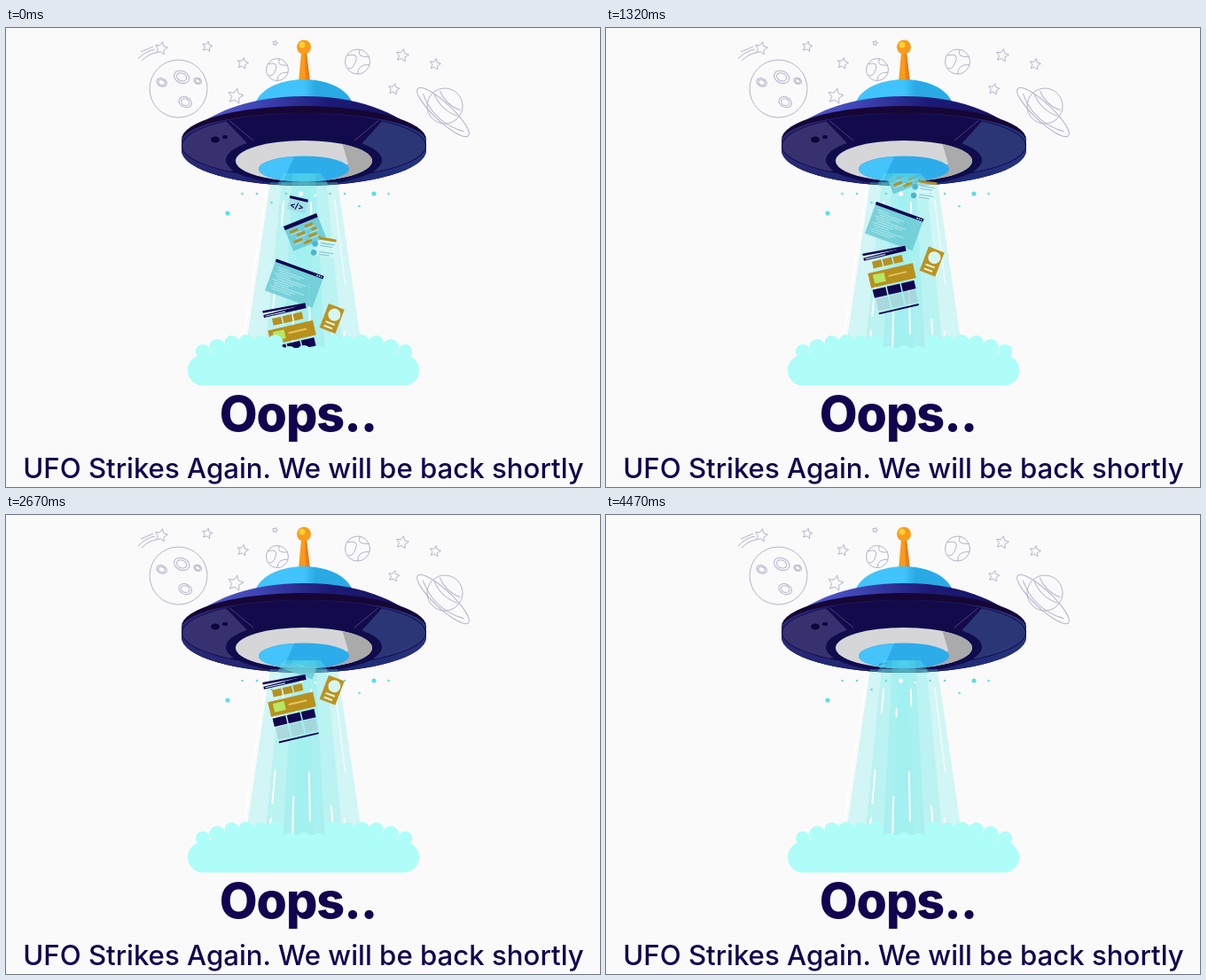
Animation of 670x518 px, one loop 4.5 s. Source, as an HTML page:

```html
<!DOCTYPE html>
<html lang="en">
<head>
<meta charset="utf-8">
<title>UFO</title>
<style>
  html, body { margin: 0; width: 100%; height: 100%; overflow: hidden; background: #fafafa; }
  svg { display: block; }
  text { font-family: Inter, "Open Sans", sans-serif; fill: #12044f; text-anchor: middle; }
  .navy { fill: #12044f; }
  .gold { stroke: #b8911c; }
</style>
</head>
<body>
<svg width="670" height="518" viewBox="0 0 670 518">
  <defs>
    <linearGradient id="hull"><stop stop-color="#5a62d8"/><stop offset=".3" stop-color="#4046b8"/><stop offset=".6" stop-color="#1d1b78"/><stop offset="1" stop-color="#141052"/></linearGradient>
    <linearGradient id="lip"><stop stop-color="#2a2a78"/><stop offset=".5" stop-color="#18206c"/><stop offset="1" stop-color="#26347e"/></linearGradient>
    <linearGradient id="dome"><stop offset=".5" stop-color="#41c4fc"/><stop offset=".62" stop-color="#2aaae4"/></linearGradient>
    <linearGradient id="fade" gradientUnits="userSpaceOnUse" x1="0" y1="166" x2="0" y2="175">
      <stop stop-color="#000"/><stop offset="1" stop-color="#fff"/>
    </linearGradient>
    <mask id="hatch" maskUnits="userSpaceOnUse" x="0" y="0" width="670" height="518">
      <rect width="670" height="518" fill="url(#fade)"/>
    </mask>
    <clipPath id="face"><ellipse cx="336" cy="133" rx="137" ry="36"/></clipPath>
    <clipPath id="ring"><ellipse cx="336" cy="150" rx="77" ry="23"/></clipPath>
  </defs>

  <g id="sky" fill="none" stroke="#b4b2cd">
    <path d="M149 35Q157 26 168 24M153 37Q161 29 169 28M152 27L166 21"/>
    <circle cx="495" cy="88" r="20"/>
    <g transform="rotate(43 493 95)">
      <ellipse cx="493" cy="95" rx="39" ry="10"/>
      <path d="M462 95Q493 111 525 95M472 87Q490 95 508 87M474 80Q490 87 506 80"/>
    </g>
  </g>

  <g id="ship">
    <path d="M333 28H339L343 61H330Z" fill="#f99b1c"/><path d="M337 28H339L343 61H338Z" fill="#ee7d17"/>
    <circle cx="336" cy="21.500" r="8" fill="#f99b1c"/><circle cx="334" cy="19" r="3.500" fill="#ffd22e"/>
    <path d="M281 85C295 49 377 49 391 85Z" fill="url(#dome)"/>
    <path d="M198 123C225 102 262 77 336 77S447 102 474 123Z" fill="url(#hull)"/>
    <path d="M198 126A138 38 0 0 1 474 126V138A138 40 0 0 1 198 138Z" fill="#160635"/>
    <path d="M198 128A138 32 0 0 1 474 128V138A138 40 0 0 1 198 138Z" fill="url(#lip)"/>
    <ellipse cx="336" cy="133" rx="138" ry="37" fill="#130a4c"/>
    <g clip-path="url(#face)">
      <path d="M198 108L246 103 274 132Q256 143 266 157L235 169 198 150Z" fill="#37316f"/>
      <path d="M474 107L426 103 400 132Q418 143 407 160L445 171 474 145Z" fill="#2b3677"/>
      <path d="M250 103L279 127M422 103L393 127" stroke="#443d7d"/>
    </g>
    <ellipse cx="336" cy="149" rx="88" ry="28" fill="#100b4b"/>
    <ellipse cx="236" cy="126" rx="5" ry="3.500" fill="#0c0739"/><ellipse cx="247" cy="123" rx="3" ry="2" fill="#0c0739"/>
    <g clip-path="url(#ring)">
      <rect x="258" y="126" width="156" height="48" fill="#d6d6d8"/>
      <path d="M378 126H414V174H360L386 153Z" fill="#aaaaab"/>
    </g>
    <ellipse cx="336" cy="159" rx="51" ry="14.500" fill="#2dacea"/>
    <path d="M285 159A51 14.500 0 0 1 325 145L313 172Q285 168 285 159Z" fill="#44c4fb"/>
  </g>

  <g id="beam" fill="#68e6e6"><path d="M314 164H355L364 177H306Z" opacity=".35"/></g>
  <g id="streaks" stroke="#fff" stroke-width="2" stroke-linecap="round"></g>
  <g id="dots"></g>

  <g mask="url(#hatch)"><g id="loot">
    <g transform="translate(320.500 189) rotate(13)">
      <rect width="21" height="16" fill="#a2dfe6"/><rect class="navy" width="21" height="3"/>
      <text x="10" y="13" font-size="9" font-weight="700">&lt;/&gt;</text>
    </g>
    <g transform="translate(313 224) rotate(-22)">
      <rect width="40" height="30" fill="#70cdd9"/><rect class="navy" width="40" height="4.500"/>
      <path class="gold" d="M4 9H36M10 15H34M4 21H32M14 26H34" stroke-width="3" stroke-dasharray="10 8"/>
      <path d="M4 12H34M8 18H36M4 24H34" stroke="#a8e4e9" stroke-dasharray="13 4"/>
    </g>
    <g transform="translate(346 235) rotate(9)">
      <path d="M7 0H27V21H3Z" fill="#def8f8" opacity=".6"/><path class="gold" d="M7 1H27" stroke-width="3"/>
      <path d="M4 8h0M4 18h0" stroke="#4eb4d0" stroke-width="6.600" stroke-linecap="round"/>
      <path d="M10 6H26M10 9H24M10 16H26M10 19H22" stroke="#88cbd7" stroke-width="1.300"/>
    </g>
    <g transform="translate(305 260.500) rotate(20)">
      <rect width="57" height="38" fill="#6ccbd5" opacity=".85"/><rect class="navy" width="57" height="3.500"/>
      <path d="M49 1.800H55" stroke="#dff" stroke-width="1.500" stroke-dasharray="1.500 1"/>
      <g id="code" stroke="#aee8ec"></g>
    </g>
    <g transform="translate(288 318.500) rotate(-13)">
      <path class="navy" d="M1 1L50 3V5.500L1 3.500ZM1 6L50 5V9H1Z"/><path d="M3 7.500H26" stroke="#ddf8f8"/>
      <path class="gold" d="M9.500 16H44" stroke-width="8" stroke-dasharray="10.500 1.500"/>
      <path class="gold" d="M2 32.500H54" stroke-width="17"/>
      <rect x="7" y="27" width="13" height="10" fill="#b8e765"/>
      <path d="M24 32H45" stroke="#e1c56a" stroke-width="2"/>
      <path d="M3 48H51" stroke="#12044f" stroke-width="9.500" stroke-dasharray="15 1.500"/>
      <path d="M4 61H50" stroke="#a4cfd4" stroke-width="14" stroke-dasharray="14 2" opacity=".75"/>
      <rect class="navy" x="4" y="70" width="46" height="2"/>
    </g>
    <g transform="translate(364 311) rotate(21)">
      <rect width="19" height="29" fill="#bd931e"/><circle cx="10.500" cy="9.500" r="7" fill="#d5f7f3"/>
      <path d="M4 20H15M4 25H14" stroke="#e5f8ee" stroke-width="2"/>
    </g>
  </g></g>

  <g id="cloud" fill="#aefdf8">
    <rect x="205" y="369" width="261" height="34.500" rx="17"/>
    <path d="M214 374L254 356H305L315 361H360L368 356H417L457 374Z"/>
  </g>

  <text x="329.500" y="455" font-size="55.500" font-weight="800" letter-spacing="-1">Oops..</text>
  <text x="335.500" y="508" font-size="31.200" font-weight="500">UFO Strikes Again. We will be back shortly</text>
</svg>
<script>
const LOOP = 4500, STEP = 30, SPEED = 0.0488;
const AXIS = 336, APEX = -84;   // the point all beam rays fan out from
const el = id => document.getElementById(id);
const rayX = (slope, y) => AXIS + slope * (y - APEX);

function add(parent, name, attrs) {
  const node = document.createElementNS("http://www.w3.org/2000/svg", name);
  for (const key in attrs) node.setAttribute(key, attrs[key]);
  el(parent).append(node);
}

function repeat(count, draw) {
  for (let i = 0; i < count; i++) draw(i);
}

function star(x, y, r) {
  let points = "";
  repeat(10, i => {
    const a = 0.2 + i * Math.PI / 5, d = i % 2 ? r * 0.48 : r;
    points += `${x + d * Math.sin(a)},${y - d * Math.cos(a)} `;
  });
  add("sky", "polygon", { points });
}

function planet(cx, cy, r) {
  add("sky", "circle", { cx, cy, r });
}

function globe(x, y, r) {
  planet(x, y, r);
  add("sky", "path", { d: `M${x - r * 0.85} ${y - r / 2}q${r} ${-r / 4} ${r * 0.7} ${r / 2}t${-r * 0.6} ${r / 2}
    M${x + r * 0.2} ${y - r}q${-r / 3} ${r * 0.7} ${r * 0.75} ${r * 0.6}M${x} ${y + r}q0 ${-r * 0.8} ${r * 0.95} ${-r * 0.75}` });
}

function moon(x, y, r) {
  planet(x, y, r);
  repeat(4, i => {
    const a = i * 2.4 - 1.3, d = r * (0.42 + i * 0.1);
    const cx = x + d * Math.cos(a), cy = y + d * Math.sin(a), size = 9 - i * 1.5;
    for (const scale of [1, 0.65])
      add("sky", "ellipse", { cx, cy, rx: size * scale, ry: size * scale * 0.75, transform: `rotate(25 ${cx} ${cy})` });
  });
}

function wedge(slope, top, opacity) {
  const bottom = 362, x = (side, y) => rayX(side * slope, y);
  add("beam", "path", { opacity, d: `M${x(-1, top)} ${top}H${x(1, top)}L${x(1, bottom)} ${bottom}H${x(-1, bottom)}Z` });
}

function streak(slope, y1, y2, opacity = 1) {
  add("streaks", "line", { x1: rayX(slope, y1), y1, x2: rayX(slope, y2), y2, opacity });
}

moon(194.5, 68.5, 32.5);
globe(306, 47, 12.5);
globe(396.5, 38, 14);
star(175, 23, 7.5);
star(227, 21, 6);
star(267, 40, 6.5);
star(259, 77, 9);
star(303.5, 17, 3);
star(447, 31, 7.5);
star(484, 41, 6.5);
star(437.5, 69, 6.5);

wedge(0.147, 174, 0.28);
wedge(0.098, 174, 0.22);
wedge(0.052, 164, 0.22);
wedge(0.025, 164, 0.1);

streak(-0.157, 184, 345, 0.7);
streak(0.125, 195, 290, 0.5);
streak(-0.082, 196, 223);
streak(-0.087, 288, 325);
streak(-0.087, 342, 350);
streak(-0.027, 219, 227);
streak(-0.029, 318, 360);
streak(0.028, 197, 215);
streak(0.016, 290, 345);
streak(0.075, 329, 350);
streak(0.107, 343, 352);

// Specks around the top of the beam, lower towards the sides; those inside it are white.
repeat(12, i => {
  const side = Math.abs(i - 5.5) / 5.5;
  add("dots", "circle", {
    cx: 250 + 16.5 * i, cy: 187 + (i % 3 ? 0 : 22 * side),
    r: i % 5 ? 1.3 : 2.6, fill: side < 0.1 ? "#fff" : "#5fe0e3"
  });
});

// Cloud bumps: low at both ends and in the middle.
repeat(15, i => {
  const side = Math.abs(i - 7);
  add("cloud", "circle", {
    cx: 222 + 16.3 * i, cy: 355 + (side < 2 ? 12 : 5 * Math.max(0, side - 5)), r: 8 + i % 2
  });
});

repeat(11, i => {
  const x1 = 4 + i % 3 * 2, y = 8 + i * 2.5;
  add("code", "line", { x1, x2: x1 + 14 + i * 17 % 23, y1: y, y2: y });
});

function draw(now) {
  const time = Math.floor(now % LOOP / STEP) * STEP;
  el("loot").setAttribute("transform", `translate(0 ${-SPEED * time})`);
  requestAnimationFrame(draw);
}
draw(0);
</script>
</body>
</html>
```
